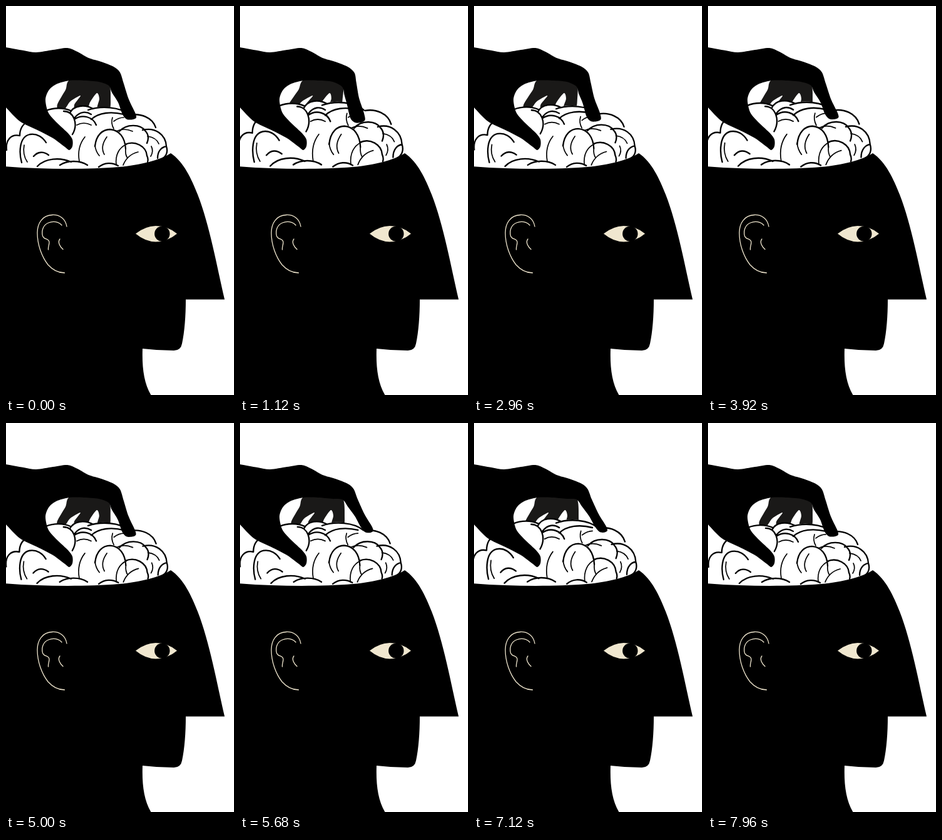
These frames come from a looping animation (364 px wide and 621 px high, 8 s). An HTML page with a canvas:

```html
<!DOCTYPE html>
<html lang="en">
<head>
<meta charset="utf-8">
<title>Hand on a mind</title>
<style>
html, body { margin: 0; width: 100%; height: 100%; overflow: hidden; background: #fff; }
canvas { display: block; width: 364px; height: 621px; }
</style>
</head>
<body>
<canvas id="stage"></canvas>
<script>
const W = 364, H = 621, LOOP = 8000, STEP = 40;
const INK = '#000', CREAM = '#f0e7cf', SHADE = '#1a1918';
const canvas = document.getElementById('stage');
const ctx = canvas.getContext('2d');
const dpr = window.devicePixelRatio || 1;
canvas.width = W * dpr;
canvas.height = H * dpr;

const head = new Path2D(
  'M-2 256 C60 261 130 261 180 257 C215 254 246 246 263 235 ' +
  'C284 249 296 276 306 301 C325 350 336 412 349 468.5 L287 468.5 ' +
  'C287 495 285 520 281 539 Q279 550 268 550 Q243 550 218 547 ' +
  'C217 577 220 602 232 622 L-2 622 Z');
const ear = new Path2D(
  'M97 352 C95 339 85 333 74 333.5 C58 334 50 347 50 362 C50 381 57 400 67 413 C75 422 83 426 93.5 426 ' +
  'M89 350 C84 344 75 343 68 346 C60 349 56 358 58.5 367 C61 374 68 370 69 377 C69 382 67 384 67.5 389 ' +
  'M86 372 C82 377 86 384 91 388.5');
const eye = new Path2D(
  'M207 363.5 Q222 351.5 239 351 Q258 351 273 363.5 Q258 376 239 376.5 Q222 376 207 363.5 Z');

const brainFill = new Path2D(
  'M-6 225 C-2 205 12 203 22 207 C22 195 28 186 40 182 L64 167 C76 162 92 162 103 166 ' +
  'C112 158 128 158 138 163 C156 158 184 162 196 174 C215 170 234 178 239 194 ' +
  'C252 201 259 213 256 224 C260 232 256 241 248 245 L240 275 L-6 275 Z');
const thick = new Path2D(
  'M1 230 C-1 214 8 204 22 207 M22 207 C22 196 27 188 36 184 ' +
  'M64 167 C76 162 92 162 103 167 M102 171 C108 158 126 157 139 164 ' +
  'M131 166 C152 159 182 161 196 173 M198 174 C215 171 234 178 239 194 ' +
  'M218 198 C238 193 255 205 256 224 C249 225 242 231 242 243 M256 224 C259 233 256 241 247 245 ' +
  'M25 250 C21 236 20 209 38 205 C50 203 59 210 64 218 ' +
  'M44 240 C51 232 60 232 68 238 M50 256 C62 243 86 241 104 249 ' +
  'M86 254 C98 246 118 246 130 254 M92 168 C108 168 116 188 106 205 ' +
  'M109 181 C122 172 139 177 144 190 M110 178 C118 168 128 168 136 173 ' +
  'M142 224 C144 205 155 197 166 197 C181 198 190 210 191 228 ' +
  'M136 181 C148 170 168 168 188 173 ' +
  'M190 221 C206 214 224 224 225 239 C227 243 227 246 226 249 ' +
  'M181 200 C193 187 215 189 222 199 C228 205 228 212 225 219 ' +
  'M148 257 C157 250 169 249 179 255');
const thin = new Path2D(
  'M29 222 Q26 237 34 249 M126 209 Q113 225 117 248 M161 209 C153 220 153 230 157 237 ' +
  'M142 222 Q143 232 149 239 M191 228 Q190 237 194 243 ' +
  'M211 233 C199 236 191 244 187 254 M170 178 Q167 187 172 196 M172 184 Q180 178 188 178 ' +
  'M176 254 C174 237 181 226 192 221 M226 208 Q240 210 244 220 ' +
  'M113 190 Q124 184 136 190 M232 224 Q236 232 231 240 M176 200 Q188 194 202 200');

const wrist = [[-12, 63], [0, 66], [28, 71], [48, 74], [75, 70], [98, 67], [114, 73], [132, 83], [152, 89], [172, 97]];
const palm = [[148, 121], [125, 119], [101, 119], [80, 125], [68, 135], [63, 150], [68, 171], [83, 188],
  [99, 203], [106, 213], [106, 224], [101, 230], [94, 225], [75, 211], [50, 198], [22, 184], [0, 162], [-12, 150]];
const index = {
  inward: [[183, 107], [185, 122], [188, 146], [194, 167], [197, 182], [192, 187], [181, 188], [173, 181], [168, 158], [166, 144], [163, 130]],
  rest:   [[182, 106], [188, 124], [196, 149], [206, 170], [208, 178], [203, 181], [193, 181], [186, 173], [179, 154], [169, 138], [164, 127]],
  out:    [[181, 105], [188, 120], [202, 143], [215, 160], [217, 167], [211, 169.5], [206, 167], [199, 158], [188, 144], [176, 130], [164, 118]]
};
const behind = [[104, 117], [95, 134], [82, 157], [84, 166], [94, 164], [103, 152], [119, 143], [109, 158], [112, 168],
  [129, 167], [134, 154], [145, 139], [149, 148], [146, 165], [165, 165], [167, 146], [166, 126], [160, 110]];

// [time, swing]: -1 inward, 0 rest, 1 out
const swings = [[0, 0], [1120, -0.75], [2000, -1], [3920, 0.05], [5000, -0.05], [6320, 1], [8000, 0]];

const mix = (a, b, k) => a + (b - a) * k;
const ease = k => k * k * (3 - 2 * k);

function swingAt(t) {
  const i = swings.findIndex(s => s[0] > t);
  const [t0, a] = swings[i - 1], [t1, b] = swings[i];
  return mix(a, b, ease((t - t0) / (t1 - t0)));
}

function swellAt(t) {
  const wave = (1 - Math.cos(t / LOOP * 6 * Math.PI)) / 2;
  return Math.pow(wave, 0.7);
}

// closed curve through all points
function blob(pts, color) {
  const n = pts.length, at = i => pts[(i + n) % n];
  ctx.beginPath();
  ctx.moveTo(...pts[0]);
  for (let i = 0; i < n; i++) {
    const p = at(i - 1), a = at(i), b = at(i + 1), q = at(i + 2);
    ctx.bezierCurveTo(
      a[0] + (b[0] - p[0]) / 7, a[1] + (b[1] - p[1]) / 7,
      b[0] - (q[0] - a[0]) / 7, b[1] - (q[1] - a[1]) / 7, b[0], b[1]);
  }
  ctx.fillStyle = color;
  ctx.fill();
}

function line(path, width, color) {
  ctx.lineWidth = width;
  ctx.strokeStyle = color;
  ctx.stroke(path);
}

function drawBrain(swell) {
  ctx.save();
  ctx.translate(130, 262);
  ctx.scale(1 + 0.022 * swell, 1 + 0.083 * swell);
  ctx.translate(-130, -262);
  ctx.fillStyle = '#fff';
  ctx.fill(brainFill);
  line(thick, 2.3, INK);
  line(thin, 1.7, INK);
  ctx.restore();
}

function drawHead() {
  ctx.fillStyle = INK;
  ctx.fill(head);
  line(ear, 1.3, CREAM);
  ctx.fillStyle = CREAM;
  ctx.fill(eye);
  ctx.fillStyle = INK;
  ctx.beginPath();
  ctx.arc(249.3, 363.7, 12.2, 0, 7);
  ctx.fill();
}

function drawHand(swing) {
  const goal = swing < 0 ? index.inward : index.out;
  const finger = index.rest.map((p, i) => p.map((v, j) => mix(v, goal[i][j], Math.abs(swing))));
  blob([...wrist, ...finger, ...palm], INK);
}

function draw(t) {
  const swing = swingAt(t);
  const pull = Math.min(swing, 0) * 5;
  ctx.setTransform(dpr, 0, 0, dpr, 0, 0);
  ctx.lineCap = ctx.lineJoin = 'round';
  ctx.fillStyle = '#fff';
  ctx.fillRect(0, 0, W, H);
  blob(behind.map(([x, y]) => [x + pull * Math.max(0, y - 118) / 35, y]), SHADE);
  drawBrain(swellAt(t));
  drawHead();
  drawHand(swing);
}

const start = performance.now();
function tick() {
  const t = (performance.now() - start) % LOOP;
  draw(Math.floor(t / STEP) * STEP);
  requestAnimationFrame(tick);
}
tick();
</script>
</body>
</html>
```
